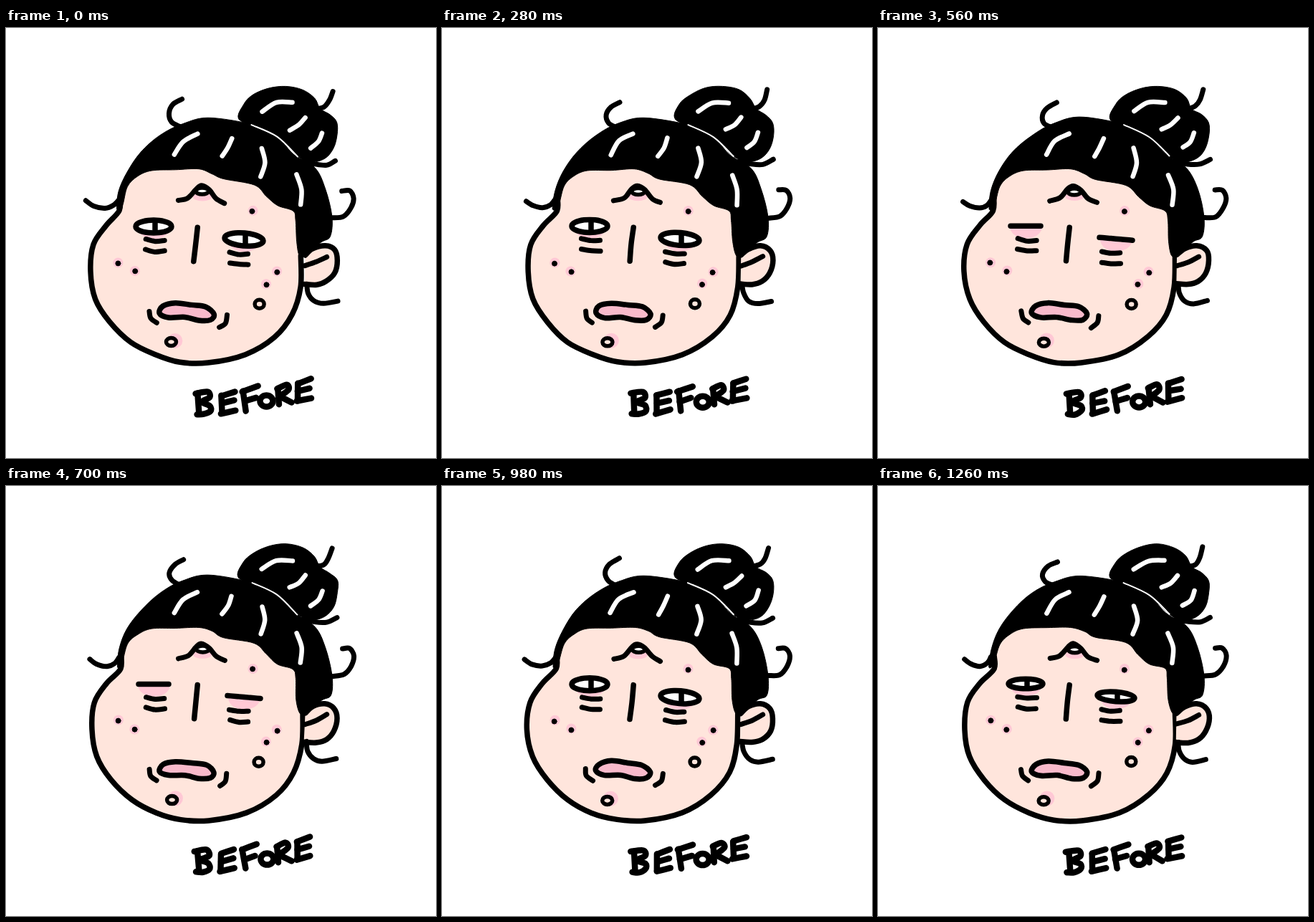
Animation, 600 px wide and 600 px high, one loop 1.4 s. Source, as an HTML page:

```html
<!DOCTYPE html>
<html lang="en">
<head>
<meta charset="utf-8">
<title>Before</title>
<style>
html, body { margin: 0; width: 100%; height: 100%; overflow: hidden; background: #fff; }
svg { display: block; width: 100%; height: 100%; }
path, ellipse { fill: none; stroke: #000; stroke-width: 7.5; stroke-linecap: round; stroke-linejoin: round; }
.skin { fill: #ffe5dc; }
.flat { stroke: none; }
.solid { fill: #000; stroke-width: 1; }
.pink { fill: #ffc8d5; stroke: none; }
.lips { fill: #f8bacb; }
.white { fill: #fff; }
.shine { stroke: #fff; stroke-width: 6.5; }
.gap { stroke: #fff; stroke-width: 2; }
.strand { stroke-width: 7; }
.thin { stroke-width: 5.5; }
.letter { stroke-width: 8.5; }
.pose { visibility: hidden; animation: twice 1400ms step-end infinite; animation-delay: calc(var(--slot) * 140ms - 1400ms); }
.pose.single { animation-name: once; }
@keyframes twice { 0%, 60% { visibility: visible; } 10%, 70%, 100% { visibility: hidden; } }
@keyframes once { 0% { visibility: visible; } 10%, 100% { visibility: hidden; } }
</style>
</head>
<body>
<svg id="stage" viewBox="0 0 600 600" role="img" aria-label="BEFORE"></svg>
<script>
// Six redrawn poses: how far loose parts sway, and how open the eyes are.
const poses = [
  { sway: 0, open: 1 }, { sway: 0.3, open: 1 }, { sway: 0.6, open: 1 },
  { sway: 1, open: 0.75 }, { sway: 0.8, open: 0 }, { sway: 0.5, open: 0 }];

const WOBBLE = 0.7;
const FACE = '160,238 158,256 139,276 122,302 118,340 125,378 145,410 174,438 208,456 243,466 282,467 334,456 375,431 400,400 411,361 412,318';
const HAIR = '155,252 158,227 169,200 188,173 214,150 246,133 288,125 365,142 402,177 431,196 446,225 455,263 453,291 440,299 418,317 410,317 405,298 404,268 400,255 379,248 363,235 346,219 303,211 288,203 269,197 236,198 203,199 184,207 170,221 162,248';
const BUN = '325,128 331,107 345,94 367,84 391,81 414,86 430,98 438,113 452,121 462,132 462,149 457,168 445,182 425,187 405,178 385,157 360,142';
const GLYPHS = {
  B: '0,0 2,28|-4,0 13,-2 16,6 5,12 16,17 17,24 8,29 -2,29',
  E: '0,0 0,24|0,0 18,-6|0,11 17,7|-1,25 19,20',
  F: '0,0 4,27|-1,0 20,-7|2,14 18,9',
  R: '0,0 2,22|-1,0 12,-5 15,2 3,11|3,11 20,20'
};

const points = text => text.split(' ').map(p => p.split(',').map(Number));

// Smooth curve through all points.
function curve(pts, closed) {
  const n = pts.length;
  const at = i => closed ? pts[(i + n) % n] : pts[Math.max(0, Math.min(n - 1, i))];
  let d = 'M' + pts[0];
  for (let i = 0; i < (closed ? n : n - 1); i++) {
    const [a, b, c, e] = [at(i - 1), at(i), at(i + 1), at(i + 2)];
    const h1 = b.map((v, k) => v + (c[k] - a[k]) / 6);
    const h2 = c.map((v, k) => v - (e[k] - b[k]) / 6);
    d += `C${h1} ${h2} ${c}`;
  }
  return closed ? d + 'Z' : d;
}

function drawPose({ sway, open }, slot) {
  let seed = slot * 977 + 11;
  const jitter = () => {
    seed = (seed * 16807) % 2147483647;
    return (seed / 2147483647 * 2 - 1) * WOBBLE;
  };
  let out = '';
  const path = (cls, d) => { out += `<path class="${cls}" d="${d}"/>`; };
  const shaky = (pts, dx = 0, dy = 0) =>
    pts.map(([x, y]) => [x + dx + jitter(), y + dy + jitter()]);
  const line = (cls, pts, dx, dy) => path(cls, curve(shaky(pts, dx, dy)));
  const shape = (cls, pts, dx, dy) => path(cls, curve(shaky(pts, dx, dy), true));
  const blob = (cls, x, y, rx, ry = rx) => {
    out += `<ellipse class="${cls}" cx="${x + jitter()}" cy="${y + jitter()}" rx="${rx}" ry="${ry}"/>`;
  };

  // Stroke whose middle is pushed sideways by bend.
  const bow = (cls, x1, y1, x2, y2, bend) => {
    const len = Math.hypot(x2 - x1, y2 - y1);
    const mid = [(x1 + x2) / 2 + bend * (y2 - y1) / len, (y1 + y2) / 2 - bend * (x2 - x1) / len];
    line(cls, [[x1, y1], mid, [x2, y2]]);
  };

  // Loose hair: the root stays put, the tip drifts.
  const strand = (text, dx, dy) => {
    const pts = points(text);
    line('strand', pts.map(([x, y], i) => {
      const k = sway * i / (pts.length - 1);
      return [x + dx * k, y + dy * k];
    }));
  };

  const eye = (cx, cy, width, tilt, bagX) => {
    path('pink', `M${cx - 22} ${cy}C${cx - 22} ${cy + 23} ${cx + 23} ${cy + 23} ${cx + 23} ${cy}Z`);
    const rx = width - 4 * (1 - open);
    const lid = Array.from({ length: 10 }, (_, i) => {
      const t = i * Math.PI / 5;
      return [cx + rx * Math.cos(t), cy + tilt * Math.cos(t) + 9 * open * Math.sin(t)];
    });
    path('white', curve(lid, true));
    if (open) path('', `M${cx + 2} ${cy - 6 * open}v${12 * open}`);
    for (const drop of [19, 33.5]) {
      line('strand', [[bagX - 13, cy + drop - 1], [bagX, cy + drop + 1.5], [bagX + 13, cy + drop + 1]]);
    }
  };

  // head
  const face = curve(shaky(points(FACE), 3 * sway));
  path('skin flat', face + 'L405 215L260 180L175 200Z');
  path('', face);
  line('skin', points('417,317 428,308 445,304 458,310 462,324 458,342 447,353 433,358 416,357'));
  bow('strand', 417, 332, 447, 319, -1.5);
  shape('solid', points(HAIR));
  shape('solid', points(BUN));
  bow('gap', 343, 135, 407, 179, 6);

  // highlights
  bow('shine', 235, 177, 267, 148, 6);
  bow('shine', 302, 179, 315, 154, -1);
  bow('shine', 357, 168, 356, 207, 5);
  bow('shine', 405, 205, 411, 247, 4);
  bow('shine', 357, 116, 400, 104, 6);
  bow('shine', 396, 142, 418, 125, -2);
  bow('shine', 425, 167, 441, 146, -4);

  strand('242,138 231,131 227,119 233,107 245,99', 6, 7);
  strand('433,113 444,110 451,101 456,88', -3, -3);
  strand('415,186 430,190 447,191 460,185', 4, -2);
  strand('455,265 471,263 482,251 485,237 479,227 468,227', 2, -1);
  strand('158,239 150,247 138,251 123,248 112,241', 9, 1);
  strand('419,357 421,370 430,381 443,385 463,381', -5, 0);

  // features
  blob('pink', 274, 236, 13, 5.5);
  blob('white thin', 274, 228, 9, 4.5);
  line('strand', points('240,241 254,237 265,225 273,220 283,226 293,238 305,244'));
  eye(206, 277 - sway, 25, 0, 208);
  eye(332, 295 - sway, 27, 2, 325);
  bow('', 267, 278, 262, 325, 0);
  shape('lips', points('214,398 219,388 236,384 259,386 279,389 290,399 285,407 269,408 249,404 227,404'), sway);
  bow('strand', 200, 395, 210, 411, -3.5);
  bow('strand', 308, 401, 298, 418, 4);

  // spots
  for (const [x, y] of points('157,328 180,340 344,256 378,341 363,358')) {
    blob('pink', x, y - 1, 7);
    blob('solid', x, y, 3.5);
  }
  blob('pink', 236, 436, 10.5);
  blob('skin thin', 353, 385, 6.5, 6);
  blob('skin thin', 231, 438.5, 7, 5.5);

  // lettering
  const letter = (name, x, y) => GLYPHS[name].split('|').forEach(run =>
    line('letter', points(run), x - 2 * sway, y));
  letter('B', 268, 510);
  letter('E', 301, 513);
  letter('F', 331, 507);
  blob('letter', 364, 521, 9, 8);
  letter('R', 379, 503);
  letter('E', 407, 496);

  const single = slot > 3 ? ' single' : '';
  return `<g class="pose${single}" style="--slot:${slot}">${out}</g>`;
}

document.getElementById('stage').innerHTML = poses.map(drawPose).join('');
</script>
</body>
</html>
```
